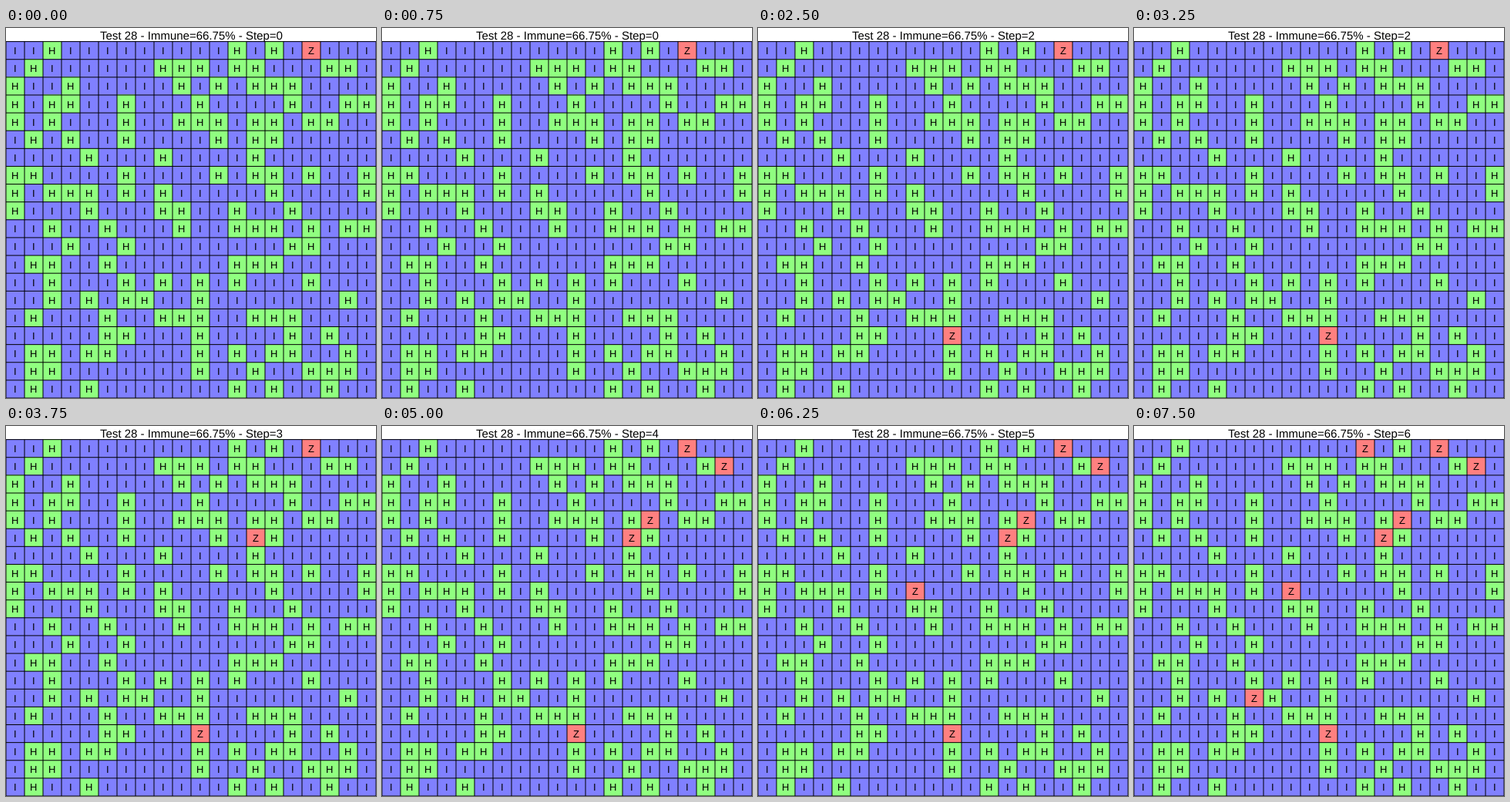
A matplotlib script that plays this animation: 480 by 480 pixels, repeating every 8000 ms.

```python
import numpy as np
import matplotlib.pyplot as plt
from matplotlib.animation import FuncAnimation
from matplotlib.colors import ListedColormap

SIZE, N = 480, 20
DPI = 96
PX = 72 / DPI                  # points per pixel
TOP = 17.6                     # upper edge of the board
CELL_W = SIZE / N
CELL_H = (SIZE - TOP) / N
FRAMES, INTERVAL, FRAMES_PER_STEP = 32, 250, 5

KINDS = "IHZ"                  # immune, healthy, zombie
COLORS = ["#8080ff", "#90ff80", "#ff8080"]

# Town map: H marks a healthy person, a dot an immune one.
TOWN = """
..H.........H.H.H...
.H......HHH.HH...HH.
H..H.....H.H.HHH....
H.HH..H...H....H..HH
H.H...H..HHH.HH.HH..
.H.H..H....H.HH.....
....H...H....H......
HH....H....H.HH.H..H
H.HHH.H.H.....H....H
H...H...HH..H..H....
..H..H...H..HHH.H.HH
...H..H........HH...
.HH..H......HHH.....
..H...H.H.H.H...H...
..H.H.HH..H.......H.
.H...H..HHH..HHH....
.....HH...H....H.H..
.HH.HH....H.H.HH..H.
.HH.......H..H..HHH.
.H..H.......H.H..H..
""".split()

# Step at which a (row, column) cell turns.
INFECTIONS = {
    (0, 16): 0,
    (16, 10): 1,
    (5, 13): 3,
    (1, 18): 4,
    (4, 14): 4,
    (8, 8): 5,
    (0, 12): 6,
    (14, 6): 6,
}

start = np.array([[int(c == "H") for c in row] for row in TOWN])
immune = 100 * np.mean(start == 0)


def board_at(step):
    board = start.copy()
    for cell, when in INFECTIONS.items():
        if step >= when:
            board[cell] = 2
    return board


plt.rcParams["font.family"] = "Liberation Sans"
plt.rcParams["text.hinting"] = "none"
fig = plt.figure(figsize=(SIZE / DPI, SIZE / DPI), dpi=DPI, facecolor="white")
ax = fig.add_axes([0, 0, 1, 1])
ax.axis("off")

image = ax.imshow(start, cmap=ListedColormap(COLORS), vmin=0, vmax=2,
                  extent=(0, SIZE, SIZE, TOP), aspect="auto",
                  interpolation="nearest")
ax.set_xlim(0, SIZE)
ax.set_ylim(SIZE, 0)

# Unsnapped lines fall between pixels and come out soft.
line_style = dict(color="black", lw=PX, solid_capstyle="butt", snap=False)
for i in range(N + 1):
    x, y = i * CELL_W, TOP + i * CELL_H
    ax.plot([x, x], [TOP, SIZE], **line_style)
    ax.plot([0, SIZE], [y, y], **line_style)


def label(x, y, size):
    return ax.text(x, y, "", fontsize=size * PX, ha="center", va="baseline")


title = label(SIZE / 2, 15, 15)
letters = {
    (r, c): label((c + 0.5) * CELL_W, TOP + (r + 0.5) * CELL_H + 5, 13)
    for r in range(N) for c in range(N)
}


def draw(frame):
    step = frame // FRAMES_PER_STEP
    board = board_at(step)
    image.set_data(board)
    for cell, text in letters.items():
        text.set_text(KINDS[board[cell]])
    title.set_text(f"Test 28 - Immune={immune:.2f}% - Step={step}")
    return [image, title, *letters.values()]


anim = FuncAnimation(fig, draw, frames=FRAMES, interval=INTERVAL,
                     repeat=True, repeat_delay=0, blit=False)
plt.show()
```
